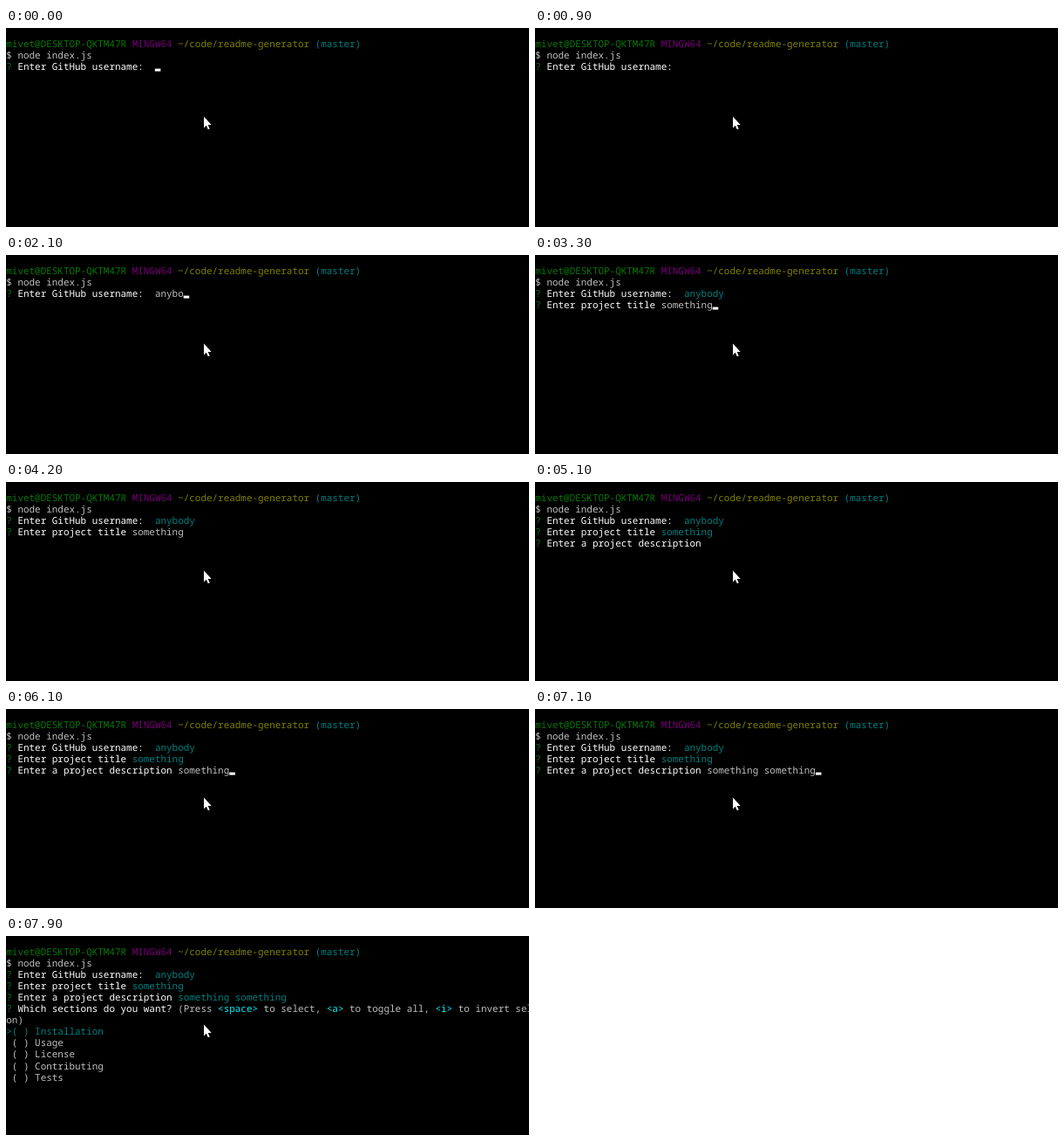
These frames come from a looping animation (600 by 228 pixels, 8 s). An HTML page:

```html
<!DOCTYPE html>
<html lang="en">
<head>
<meta charset="utf-8">
<title>Terminal prompts</title>
<style>
  html, body { margin: 0; width: 100%; height: 100%; overflow: hidden; background: #000; }
  svg { display: block; width: 600px; height: 228px; background: #000; }
  text {
    font: 10.95px "Noto Sans Mono", "DejaVu Sans Mono", monospace;
    text-rendering: geometricPrecision;
    white-space: pre;
  }
  .bold { font-weight: 500; }
</style>
</head>
<body>
<svg viewBox="0 0 600 228">
  <g id="screen"></g>
  <rect id="cursor" width="6.57" height="3" fill="#fff"/>
  <path d="M227 101.5v13l2.8-2.7 2 4.4 1.9-.8-2-4.4h4z" fill="#fff"/>
</svg>
<script>
const LOOP = 8000, STEP = 100, BLINK = 500, CELL = 6.57;
const NS = "http://www.w3.org/2000/svg";
const C = {
  green: "#0a780a", purple: "#760076", olive: "#808000", cyan: "#008080",
  grey: "#c0c0c0", white: "#fff", bright: "#00f0f8"
};

// Typing steps are [time, letters shown]; each prompt opens when the one before is entered.
const prompts = [
  { label: "Enter GitHub username:  ", answer: "anybody", open: 0, enter: 2500,
    keys: [[1900, 2], [2000, 3], [2100, 5], [2200, 6], [2300, 7]] },
  { label: "Enter project title ", answer: "something", open: 2500, enter: 4600,
    keys: [[2900, 4], [3000, 7], [3300, 9]] },
  { label: "Enter a project description ", answer: "something something", open: 4600, enter: 7400,
    keys: [[5800, 3], [5900, 5], [6000, 7], [6100, 9], [6200, 10], [6300, 11], [6400, 12],
           [6500, 13], [6600, 14], [6700, 15], [6800, 16], [6900, 17], [7000, 18], [7100, 19]] }
];

const header = [
  [["mivet@DESKTOP-QKTM47R ", "green"], ["MINGW64 ", "purple"],
   ["~/code/readme-generator ", "olive"], ["(master)", "cyan"]],
  [["$ node index.js", "grey"]]
];

const menu = [
  [["? ", "green"], ["Which sections do you want? ", "white"], ["(Press ", "grey"],
   ["<space>", "bright"], [" to select, ", "grey"], ["<a>", "bright"],
   [" to toggle all, ", "grey"], ["<i>", "bright"], [" to invert selecti", "grey"]],
  [["on)", "grey"]],
  [[">( ) Installation", "cyan"]],
  ...["Usage", "License", "Contributing", "Tests"].map(s => [[" ( ) " + s, "grey"]])
];

const screen = document.getElementById("screen");
const cursor = document.getElementById("cursor");
const baseline = row => Math.round(21.7 + 13.08 * row);

function makeLine(parts, row) {
  const line = document.createElementNS(NS, "text");
  line.setAttribute("x", 0.3);
  line.setAttribute("y", baseline(row));
  for (const [words, color] of parts) {
    const span = document.createElementNS(NS, "tspan");
    span.textContent = words.replace(/ /g, "\u00a0");
    span.setAttribute("fill", C[color]);
    if (color === "white") span.setAttribute("class", "bold");
    line.append(span);
  }
  return line;
}

function draw(t) {
  const lines = [...header];
  let caret = null;
  for (const p of prompts) {
    if (t < p.open) break;
    const done = t >= p.enter;
    const [last, count] = p.keys.filter(k => k[0] <= t).pop() || [p.open, 0];
    lines.push([["? ", "green"], [p.label, "white"],
                [p.answer.slice(0, count), done ? "cyan" : "grey"]]);
    if (!done) caret = { col: 2 + p.label.length + count, row: lines.length - 1, last };
  }
  if (!caret) lines.push(...menu);
  screen.replaceChildren(...lines.map(makeLine));

  const lit = caret && Math.floor((t - caret.last) / BLINK) % 2 === 0;
  cursor.setAttribute("visibility", lit ? "visible" : "hidden");
  if (lit) {
    cursor.setAttribute("x", caret.col * CELL);
    cursor.setAttribute("y", baseline(caret.row) - 1.4);
  }
}

const start = performance.now();
let shown = -1;
function tick() {
  const t = Math.floor(((performance.now() - start) % LOOP) / STEP) * STEP;
  if (t !== shown) draw(shown = t);
  requestAnimationFrame(tick);
}
tick();
</script>
</body>
</html>
```
